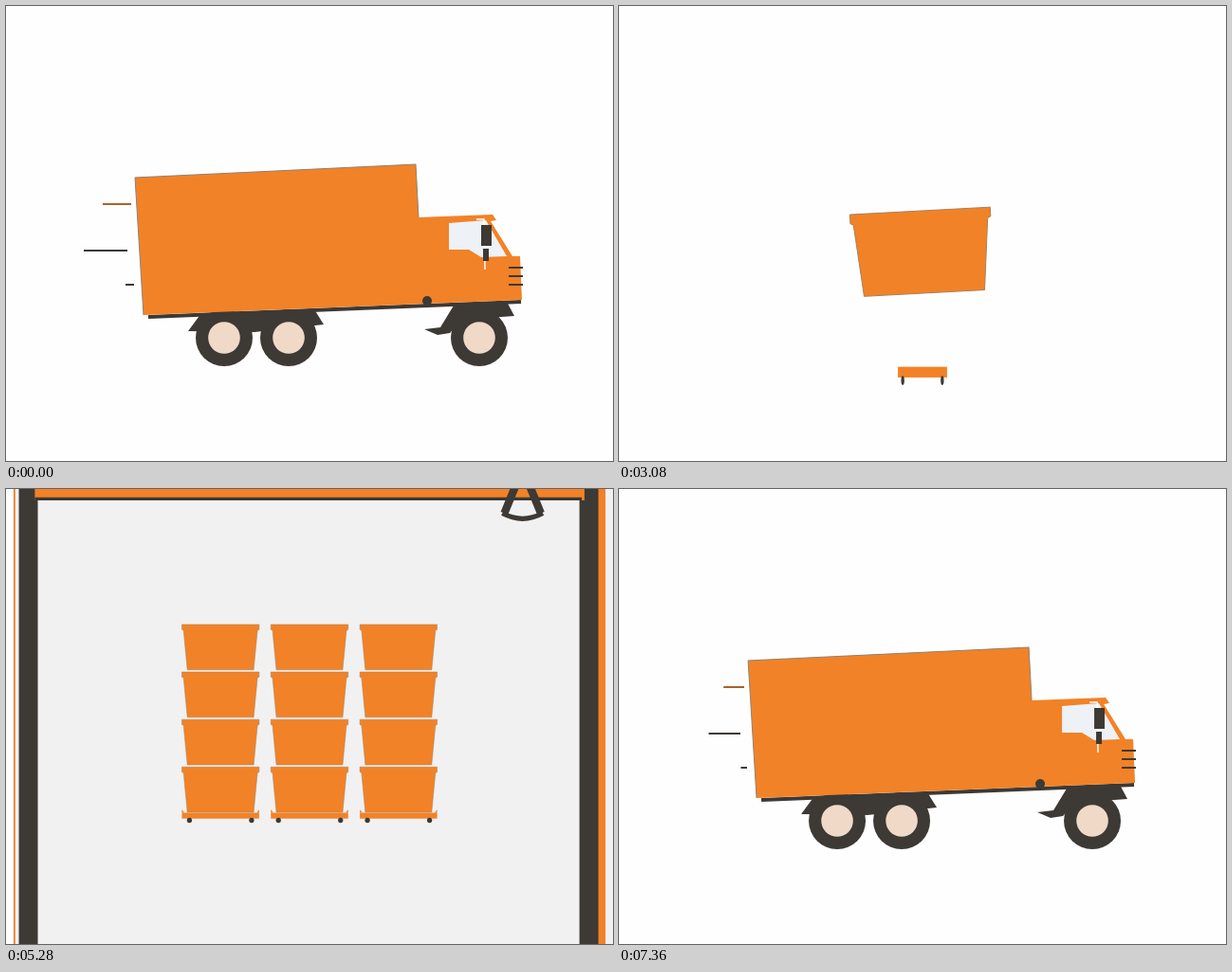
Animation, 640 px wide and 480 px high, one loop 7440 ms. Source, as an HTML page with a canvas:

```html
<!DOCTYPE html>
<html>
<head>
<meta charset="utf-8">
<style>
html, body { margin: 0; width: 100%; height: 100%; overflow: hidden; background: #fefefe; }
canvas { display: block; }
</style>
</head>
<body>
<canvas id="stage" width="640" height="480"></canvas>
<script>
const ctx = document.getElementById('stage').getContext('2d');
const LOOP = 7440, WHITE = '#fefefe', ORANGE = '#f28227', DARK = '#3d3935', LIGHT = '#f1f1f2', TAN = '#b3855f';
const clamp = v => Math.max(0, Math.min(1, v));
const mix = (a, b, p) => a + (b - a) * p;
const span = (t, a, b) => clamp((t - a) / (b - a));
const smooth = p => p * p * (3 - 2 * p);
const easeOut = p => 1 - (1 - p) ** 3;
const backOut = p => 1 + 3.2 * (p - 1) ** 3 + 2.2 * (p - 1) ** 2;
const hump = p => Math.sin(Math.PI * p);

function trace(pts) {
  ctx.beginPath();
  for (let i = 0; i < pts.length; i += 2) ctx.lineTo(pts[i], pts[i + 1]);
}
function poly(color, ...pts) {
  trace(pts);
  ctx.fillStyle = color;
  ctx.fill();
}
function line(color, width, ...pts) {
  trace(pts);
  ctx.strokeStyle = color;
  ctx.lineWidth = width;
  ctx.stroke();
}
function disc(color, x, y, r) {
  ctx.beginPath();
  ctx.arc(x, y, r, 0, 7);
  ctx.fillStyle = color;
  ctx.fill();
}
function rect(color, x, y, w, h) {
  ctx.fillStyle = color;
  ctx.fillRect(x, y, w, h);
}
// Draws in a moved, turned and scaled frame; the local origin lies at (ox, oy).
function placed(x, y, sx, sy, turn, draw, ox = 0, oy = 0) {
  ctx.save();
  ctx.translate(x, y);
  ctx.rotate(turn * Math.PI / 180);
  ctx.scale(sx, sy);
  ctx.translate(-ox, -oy);
  draw();
  ctx.restore();
}

// ---- Truck ----
function body() {
  line(DARK, 4, 150, 328, 543, 312);
  poly(ORANGE, 136, 181, 432, 167, 435, 223, 513, 220, 517, 226, 511, 227, 534, 264, 542, 264, 544, 310, 145, 326);
  line('#8f826f', 1, 145, 326, 136, 181, 432, 167, 435, 223);
  poly('#eef1f6', 467, 229, 506, 226, 528, 264, 501, 265, 488, 257, 467, 257);
  line(WHITE, 1.5, 496, 225, 504, 225, 505, 278);
  rect(DARK, 501, 231, 11, 22);
  rect(DARK, 503, 256, 6, 13);
  for (let y = 276; y < 300; y += 9) line(DARK, 2, 530, y, 545, y);
  disc(DARK, 444, 311, 5);
}
function truck(lean) {
  placed(7 * (1 - lean), 0, 1, 1, 0, () => {
    poly(DARK, 206, 324, 325, 320, 335, 336, 262, 344, 192, 343);
    poly(DARK, 472, 316, 528, 312, 536, 327, 480, 331, 468, 345, 455, 347, 441, 341, 458, 339);
    for (const x of [230, 298, 499]) {
      disc(DARK, x, 350, 30);
      disc('#f0d9c7', x, 350, 16.8);
    }
    placed(344, 318, 1, 1, 2.6 * (1 - lean), body, 344, 318);
  });
}
function drive(t) {
  const leaving = t < 1200;
  const x = leaving ? 440 * (t / 760) ** 1.25 : 0;
  const lean = leaving ? 1 : smooth(span(t, 6980, 7380));
  const grow = leaving ? 1 + 0.5 * span(t, 0, 160) : span(t, 7200, 7420);
  const lag = leaving ? 0.025 * t : 0;
  placed(x, 0, 1, 1, 0, () => {
    truck(lean);
    line('#a9622c', 2, 132, 209, 132 - 30 * grow - lag, 209);
    line(DARK, 2, 128, 258, 128 - 46 * grow - lag, 258);
    line(DARK, 2, 135, 294, 135 - 9 * grow - lag, 294);
  });
}

// ---- Crates and dollies ----
function crate() {
  const shape = [-46, 0, 46, 0, 46, 6, 44, 7, 39.5, 54, -39.5, 54, -44, 7, -46, 6, -46, 0];
  poly(ORANGE, ...shape);
  line('#a88055', 0.6, ...shape);
}
function dolly(lip) {
  rect(ORANGE, -46, 1, 92, 7);
  for (const side of [-1, 1]) {
    poly(ORANGE, 46 * side, 1 - 4 * lip, 43 * side, 1, 46 * side, 1);
    disc(DARK, 37 * side, 10, 3);
  }
}

function firstCrate(t) {
  if (t < 2440) {
    const p = span(t, 1660, 2400), ring = Math.exp(-5 * p);
    const grow = speed => 1.61 * (1 - ring * Math.cos(speed * p));
    placed(320, 238, grow(9), grow(12), 12 * ring * Math.sin(10 * p), crate, 0, 27);
    return;
  }
  const jump = span(t, 2547, 3161);
  const top = t < 2547 ? 195 : Math.min(293, 100 + 116 * ((t - 2800) / 280) ** 2);
  const flat = 0.12 * hump(span(t, 2430, 2547)) + 0.14 * hump(span(t, 3161, 3280));
  const turn = -11.5 * hump(jump) * Math.cos((t - 2800) / 330);
  const zoom = smooth(span(t, 3280, 3640)), s = mix(1.61, 1, zoom), base = mix(379, 352.5, zoom);
  const roll = span(t, 3010, 3210), apart = 106 * backOut(span(t, 3380, 3760));
  if (t > 3380) for (const side of [-1, 1]) placed(320 + side * apart, base, s, s, 0, () => dolly(0));
  placed(320, base, s * roll, s, 0, () => dolly(span(t, 3161, 3300)));
  placed(mix(322, 320, zoom), mix(top, base - 54, zoom) + 54 * s,
    s * (1 + 0.7 * flat), s * (1 - flat), turn, crate, 0, 54);
}

// Each column starts falling a few beats apart, one crate per beat.
function stack(t, scale) {
  const beat = 82, lead = [0, -3, 1];
  placed(320, 249, scale, scale, 0, () => {
    for (let col = 0; col < 3; col++) {
      const x = 214 + 106 * col, hit = t - 3880 - beat * lead[col];
      const squash = hit > 0 ? 0.2 * Math.exp(-hit / 130) * Math.cos(hit / 90) : 0;
      if (t > 3760) placed(x, 352.5, 1 + squash, 1, 0, () => dolly(smooth(span(hit, 40, 240))));
      if (hit > 0 && hit < 180) {
        const d = hit * 0.14;
        line(TAN, 2.5, x - 50 - d, 346, x - 60 - d, 341);
        line(TAN, 1.5, x - 50, 343, x - 53, 339);
        line(TAN, 1.5, x + 48, 347, x + 51, 341);
      }
      for (let row = 0; row < 4; row++) {
        if (col === 1 && row === 0 && t < 3760) continue;
        const late = hit - beat * row, after = Math.max(0, late);
        const bounce = (14 + 12 * row) * Math.abs(Math.sin(after * Math.PI / 180)) * Math.exp(-after / 140);
        const tilt = 4.5 * Math.sin(1.3 * row + 0.2 * col) * Math.exp(-after / 80) * Math.cos(after / 60);
        placed(x, 326 - 56.6 * row + Math.min(0, late) - bounce, 1, 1, tilt, crate, 0, 27);
      }
    }
  }, 320, 249);
}

// ---- Cargo box: a perspective view that closes, turns and shrinks ----
function cargo(t) {
  const turn = smooth(span(t, 5540, 6960)), angle = turn * Math.PI / 2;
  const shrink = 1 - (1 - span(t, 6040, 6960)) ** 2;
  const high = mix(514 + 440 * (1 - span(t, 4720, 5440)) ** 2, 145, shrink);
  const wide = 1.165 * high, near = mix(wide / 2, -169, turn * turn);
  const mid = mix(242, 244.5, turn);
  // An upright edge of the box as [x, top, bottom].
  const upright = (x, depth) => {
    const k = 1 / (1 + 0.613 * depth);
    return [320 + x * k, mid - high * k / 2, mid + high * k / 2];
  };
  const [xl, tl, bl] = upright(near - wide * Math.cos(angle), 1.165 * Math.sin(angle));
  const [xr, tr, br] = upright(near, 0);
  const [xs, ts, bs] = upright(near + 2 * high * Math.sin(angle), 2 * Math.cos(angle));

  ctx.globalAlpha = 1 - span(t, 6040, 6200);
  rect(LIGHT, xr - 1, 0, Math.max(0, 641 - xr), 480);
  ctx.globalAlpha = 1;

  if (xs > xr) {
    if (t > 6120) {
      ctx.save();
      ctx.transform((xs - xr) / 290, (ts - tr + bs - br) / 580, 0, (bs - ts) / 145, xs, ts);
      ctx.translate(-441, -172);
      truck(0);
      ctx.restore();
    }
    const paint = span(t, 6060, 6360);
    const tone = [241, 241, 242].map((c, i) => Math.round(mix(c, [242, 130, 39][i], paint)));
    poly(`rgb(${tone})`, xr, tr, xs, ts, xs, bs, xr, br);
  }
  if (xr > xl + 2) rear(t, xl, tl, bl, xr, tr, br);
}

function rear(t, xl, tl, bl, xr, tr, br) {
  const ratio = (bl - tl) / (br - tr), size = (br - tr) / 514;
  const at = (u, v) => {
    const f = u * ratio / (1 - u + u * ratio);
    return [mix(xl, xr, f), mix(mix(tl, tr, f), mix(bl, br, f), v)];
  };
  const pane = (color, u0, v0, u1, v1) =>
    poly(color, ...at(u0, v0), ...at(u1, v0), ...at(u1, v1), ...at(u0, v1));

  if (t > 5540) placed(xl, bl, size * Math.min(1, (xr - xl) / 300), size, 0, () => {
    poly(TAN, -12, 24, 13, 9, 30, 42, -8, 42);
    poly(DARK, 13, 0, 440, 40, 440, 60, 90, 38, 62, 14, 13, 44);
    poly(TAN, 58, 18, 65, 27, 40, 44, 14, 44);
    disc(TAN, 107, 35, 5);
  });

  const shut = smooth(span(t, 5210, 5740)), low = mix(0.026, 0.962, shut);
  pane(ORANGE, 0, 0, 1, 1);
  if (shut < 1) pane(LIGHT, 0.003, 0, 0.01, 1);
  pane(DARK, 0.009, 0.012, 0.988, 0.99);
  pane(LIGHT, 0.041, 0.026, 0.956, 0.96);
  if (shut < 1) stack(t, mix(1, 0.884, easeOut(span(t, 4720, 5440))));
  pane(ORANGE, 0.036, 0.022, mix(0.965, 0.955, shut), low);
  pane(DARK, 0.036, low - 0.006, 0.96, low);

  const [hx, hy] = at(0.86, low), foot = mix(21, 10, shut);
  placed(hx, hy, size * Math.min(1, (xr - xl) / 400), size, 0, () => {
    rect(LIGHT, -12, -49, 25, 24);
    for (const side of [-1, 1]) line(DARK, 8, 3 * side, -25, foot * side * 0.9, 13);
    ctx.beginPath();
    ctx.moveTo(-foot, 13);
    ctx.quadraticCurveTo(0, 24, foot, 13);
    ctx.lineWidth = 5;
    ctx.stroke();
  });
}

function frame(now) {
  const t = Math.floor(now % LOOP / 40) * 40;
  rect(WHITE, 0, 0, 640, 480);
  if (t < 1080 || t > 6960) drive(t);
  else if (t >= 4720) cargo(t);
  else if (t >= 1680) {
    if (t < 3760) firstCrate(t);
    if (t > 3200) stack(t, 1);
  }
}
const start = performance.now();
function tick() {
  frame(performance.now() - start);
  requestAnimationFrame(tick);
}
tick();
</script>
</body>
</html>
```
